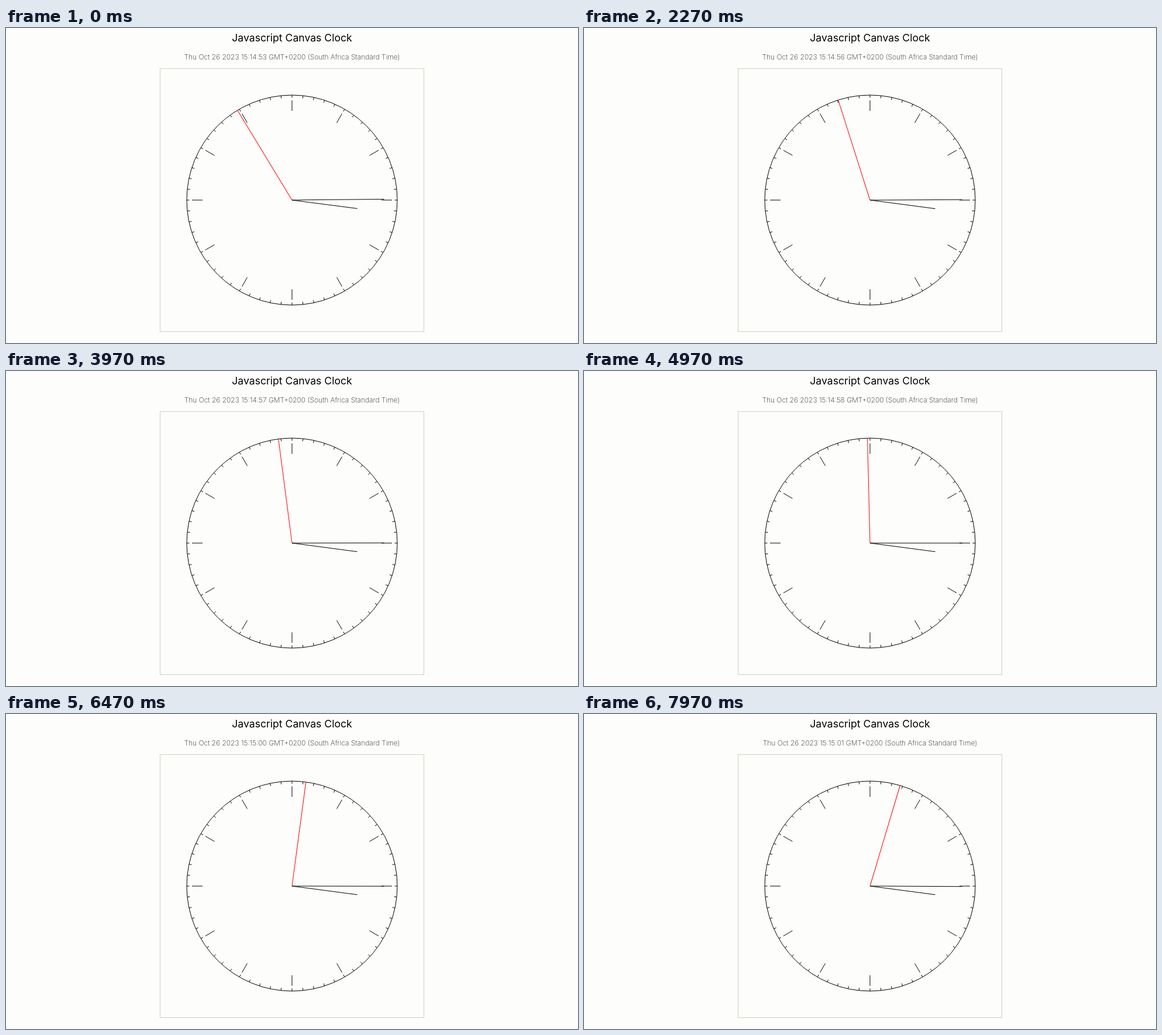
An HTML page for the animation above (8 s loop, 978 by 540 pixels).

```html
<!DOCTYPE html>
<html lang="en">
<head>
<meta charset="utf-8">
<title>Javascript Canvas Clock</title>
<style>
  html, body { margin: 0; width: 100%; height: 100%; overflow: hidden; background: #fdfdfc; }
  svg { display: block; width: 978px; height: 540px; }
  text { font-family: Inter, sans-serif; text-anchor: middle; }
  .title { font-size: 17.6px; font-weight: 400; }
  .date { font-size: 12px; font-weight: 200; fill: #222; }
  .frame { fill: none; stroke: #d0d0c0; }
  .dial { fill: none; stroke: #000; }
  .second { stroke: #f00; }
</style>
</head>
<body>
<svg viewBox="0 0 978 540">
  <text class="title" x="489" y="23">Javascript Canvas Clock</text>
  <text class="date" id="date" x="489" y="54"></text>
  <rect class="frame" x="263.5" y="69.5" width="451" height="451"/>
  <g class="dial" transform="translate(489 295)">
    <circle r="180"/>
    <path id="ticks"/>
    <path id="hour" d="M0 0V-112.5"/>
    <path id="minute" d="M0 0V-157.5"/>
    <path id="second" class="second" d="M0 0V-180"/>
  </g>
</svg>
<script>
  const LOOP = 8000;
  const STEP = 1000 / 30;
  const START = 15 * 3600 + 14 * 60 + 53.8;
  const HAND_LEAD = 1; // the hands run one second ahead of the text

  const byId = id => document.getElementById(id);
  const pad = n => String(Math.floor(n)).padStart(2, '0');

  function tick(turn, inner, outer) {
    const x = Math.sin(turn * 2 * Math.PI);
    const y = -Math.cos(turn * 2 * Math.PI);
    return `M${x * inner} ${y * inner}L${x * outer} ${y * outer}`;
  }

  let ticks = '';
  for (let i = 0; i < 60; i++) {
    ticks += tick(i / 60, 175.5, 180);
    if (i % 5 === 0) ticks += tick(i / 60, 153, 171);
  }
  byId('ticks').setAttribute('d', ticks);

  function rotate(id, seconds, period) {
    byId(id).setAttribute('transform', `rotate(${seconds % period / period * 360})`);
  }

  function draw(ms) {
    const elapsed = Math.floor((ms + 3.4) / STEP) * STEP % LOOP;
    const now = START + elapsed / 1000;
    const time = [now / 3600, now / 60 % 60, now % 60].map(pad).join(':');
    const label = `Thu Oct 26 2023 ${time} GMT+0200 (South Africa Standard Time)`;
    if (byId('date').textContent !== label) byId('date').textContent = label;

    const hands = now + HAND_LEAD;
    rotate('hour', hands, 43200);
    rotate('minute', hands, 3600);
    rotate('second', hands, 60);
  }

  const origin = performance.now();
  function loop() {
    draw((performance.now() - origin) % LOOP);
    requestAnimationFrame(loop);
  }
  loop();
</script>
</body>
</html>
```
